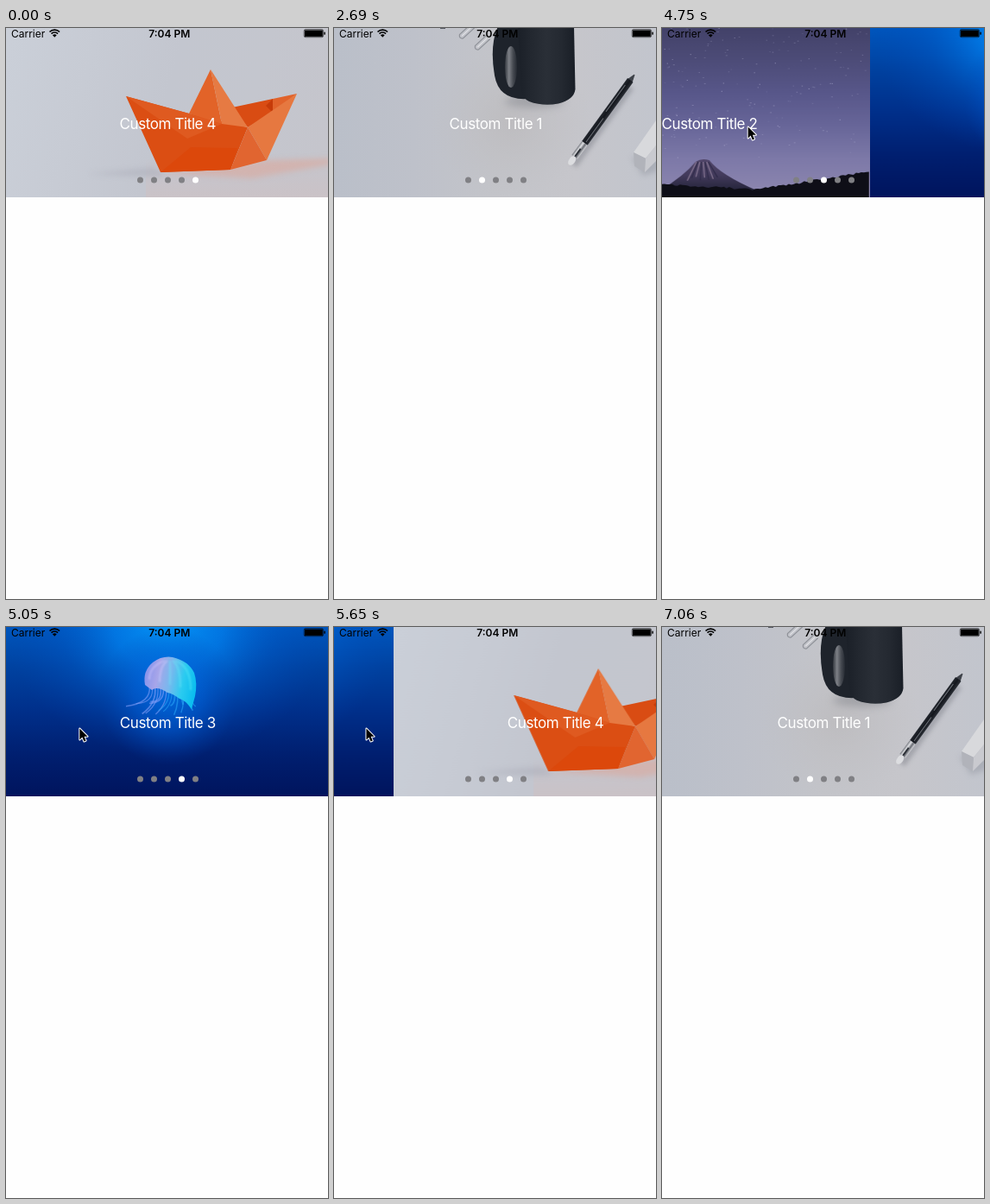
Recreate the animation shown at these times as an HTML page with a canvas. Size 373 px wide and 661 px high, loop 8 s.

```html
<!DOCTYPE html>
<html lang="en">
<head>
<meta charset="utf-8">
<title>Banner carousel</title>
<style>
  html, body { margin: 0; width: 100%; height: 100%; overflow: hidden; background: #fefefe; }
  canvas { display: block; width: 373px; height: 661px; }
</style>
</head>
<body>
<canvas id="stage"></canvas>
<script>
const W = 373, H = 661, BANNER = 196, LOOP = 8000;
const scale = window.devicePixelRatio || 1;
let g;

function prepare(canvas, w, h) {
  canvas.width = Math.round(w * scale);
  canvas.height = Math.round(h * scale);
  const ctx = canvas.getContext('2d');
  ctx.scale(scale, scale);
  return ctx;
}

// ---- drawing helpers ----
function stops(grad, colors) {
  colors.forEach((c, i) => grad.addColorStop(i / (colors.length - 1), c));
  return grad;
}
const lin = (x0, y0, x1, y1, ...colors) => stops(g.createLinearGradient(x0, y0, x1, y1), colors);
const across = (x0, x1, ...colors) => lin(x0, 0, x1, 0, ...colors);
const down = (y0, y1, ...colors) => lin(0, y0, 0, y1, ...colors);
const rad = (r, ...colors) => stops(g.createRadialGradient(0, 0, 0, 0, 0, r), colors);

function fill(style, x = 0, y = 0, w = W, h = BANNER) {
  g.fillStyle = style;
  g.fillRect(x, y, w, h);
}
function poly(style, ...points) {
  g.beginPath();
  points.forEach(([x, y]) => g.lineTo(x, y));
  g.closePath();
  g.fillStyle = style;
  g.fill();
}
function oval(style, x, y, rx, ry = rx) {
  g.beginPath();
  g.ellipse(x, y, rx, ry, 0, 0, 7);
  g.fillStyle = style;
  g.fill();
}
function shape(style, d) {
  g.fillStyle = style;
  g.fill(new Path2D(d));
}
function line(style, width, d) {
  g.strokeStyle = style;
  g.lineWidth = width;
  g.stroke(new Path2D(d));
}
function blurred(px, draw) {
  g.save();
  g.filter = `blur(${px * scale}px)`;
  draw();
  g.restore();
}
function placed(x, y, turn, draw) {
  g.save();
  g.translate(x, y);
  g.rotate(turn);
  draw();
  g.restore();
}
function glow(x, y, r, stretch, ...colors) {
  placed(x, y, 0, () => {
    g.scale(stretch, 1);
    oval(rad(r, ...colors), 0, 0, r);
  });
}
function randomFrom(seed) {
  return () => (seed = seed * 16807 % 2147483647) / 2147483647;
}

// ---- slides ----
function tower() {
  fill(lin(-58, 177, 30, -90, '#a9abcb', '#8ea4d7', '#6497d5', '#4487c8', '#1e7cc8', '#0075c6'));
  glow(208, 0, 48, 1, 'rgba(185,160,214,.95)', 'rgba(145,150,215,.65)', 'rgba(60,130,205,0)');
  blurred(2.5, () => {
    fill(across(168, 212, '#b98a62', '#b1786f', '#dcb29f', '#c7a5b4'), 168, -8, 43, 66);
    oval('#e8c8af', 198, 28, 7, 13);
    oval(across(157, 219, '#cf973c', '#9b683d', '#654643', '#76545a', '#a38992'), 188, 70, 30, 19);
    line('#d0953f', 5, 'M166 84 Q158 64 170 38');
    oval('#60434a', 186, 68, 12, 11);
  });
  blurred(1.2, () => fill(across(162, 215, '#dba85c', '#cb9852', '#8f7163', '#555568', '#5c5d70',
    '#81798a', '#9c909f', '#938b9b', '#9094b8'), 162.5, 84, 52, 118));
}

function pencil() {
  // drawn along its own axis, from the tip
  blurred(2.5, () => fill('rgba(110,114,124,.4)', 14, -9, 112, 8));
  poly('#3f434a', [0, -.6], [9, -3.5], [9, 3.5], [0, .6]);
  fill(down(-4, 4, '#2c3037', '#14171d', '#23272e'), 8, -4, 90, 8);
  fill('#72767d', 16, 1, 38, 1);
  fill('#72767d', 62, -1, 34, 1);
  fill(down(-4, 4, '#d4d5d9', '#686b72', '#e0e1e4', '#777a81'), 98, -4, 20, 8);
  fill('#2b2f36', 106, -1, 14, 2);
  oval('#dcdde0', 123, 0, 6, 3.6);
}

function desk() {
  fill(across(0, W, '#babfc9', '#bec1ca', '#c3c4c9', '#c6c6cb', '#c2c5cd'));
  glow(205, 110, 85, 1.1, 'rgba(186,184,186,.65)', 'rgba(190,189,192,.4)', 'rgba(190,190,195,0)');
  blurred(5, () => oval('rgba(120,122,130,.45)', 232, 85, 34, 7));
  // paper clips
  for (const [x, y] of [[144, 9], [162, 22]]) {
    placed(x, y, -.75, () => {
      line('#8f9299', 1.2, 'M20 0 H2 Q-2 3 2 6 H20');
      line('#e4e5e9', 1, 'M3 3 H18');
    });
  }
  fill('#555961', 123, 0, 6, 1);
  // mug
  shape('#1e232b', 'M190 -2 Q180 20 186 55 Q191 84 224 82 L232 -2 Z');
  oval(across(198, 212, '#34383f', '#7d8086', '#474b52', '#252a32'), 205, 45, 7, 24);
  shape(across(212, 280, '#1a1f27', '#232830', '#2a2f37', '#242931', '#191e26'),
    'M213 -2 H278 L279.5 71 Q278 83 260 87.5 Q242 91 226 85 Q218 81 217 73 Z');
  placed(348, 54, Math.atan2(106, -77), pencil);
  // eraser
  blurred(3, () => poly('rgba(135,139,149,.4)', [345, 150], [358, 171], [376, 165], [376, 145]));
  const edge = [361, 151], left = [347, 144];
  poly('#d8d9dc', [W, 107], left, edge, [W, 136]);
  poly('#b1b3ba', left, edge, [360, 167], [348, 160]);
  poly('#c9cacf', edge, [W, 136], [W, 154], [360, 167]);
}

function night() {
  fill(down(0, 190, '#434269', '#4d4c78', '#58578a', '#686699', '#7d79a8', '#8c86af'));
  const rnd = randomFrom(71);
  for (let i = 0; i < 230; i++) {
    g.globalAlpha = .15 + .4 * rnd();
    fill('#d5d4ef', rnd() * W, rnd() ** 1.3 * 150, 1, 1);
  }
  g.globalAlpha = 1;
  shape(down(152, 188, '#51466a', '#433b5c', '#25243b'),
    'M130 188 Q158 171 171 155 Q178 150 187 153 Q200 170 242 188 Z');
  for (let i = 0; i < 8; i++) {
    const x = 172 + i * 2, fan = (i - 3.5) * 3;
    line(i % 2 ? '#302b49' : '#877793', 1.2, `M${x} 155 L${x + fan} ${170 + rnd() * 8}`);
  }
  let land = 'M0 196';
  for (let x = 0; x <= W; x += 3) {
    const base = x < 240 ? 178 + 9 * (x / 240) ** 2 : 187 - (x - 240) * .158;
    land += `L${x} ${base + rnd() * 2.5 - 1}`;
  }
  shape('#0e0e17', land + 'V196 Z');
}

function jelly() {
  fill(down(0, BANNER, '#0056bd', '#00419f', '#002f8a', '#001f70', '#00145d'));
  glow(188, 0, 150, 1.25, 'rgba(4,151,250,.95)', 'rgba(2,127,237,.78)', 'rgba(0,93,205,.35)', 'rgba(0,70,180,0)');
  glow(188, 80, 80, 1, 'rgba(0,112,232,.75)', 'rgba(0,94,215,.5)', 'rgba(0,70,180,0)');
  // trailing arms
  blurred(.7, () => {
    const rnd = randomFrom(19);
    for (let i = 0; i < 15; i++) {
      const x = 166 + i * 3.2, end = x - 27 + i * 2.1 + rnd() * 9;
      line(i < 7 ? 'rgba(130,157,246,.6)' : 'rgba(43,170,247,.55)', 1 + rnd(),
        `M${x} 68 Q${x + 3} 88 ${end} ${86 + rnd() * 16}`);
    }
  });
  shape(lin(161, 50, 221, 62, '#8593ec', '#a7a5e9', '#78b8ee', '#2bcbf0', '#0bbdef'),
    'M161 67 Q158 51 170 41 Q181 33 193 35 Q211 39 218 53 Q222 65 219 80 L215 95 Q207 84 201 83 Q193 77 187 76 Q175 68 169 73 Z');
  // ribs fan out from the crown
  blurred(1, () => {
    for (let i = 0; i < 5; i++) {
      const x = 166 + i * 12;
      line(i < 2 ? 'rgba(220,207,255,.55)' : 'rgba(105,243,250,.5)', 1.7,
        `M${x} ${61 + i * 3} Q${x} 45 ${184 + i * 3} 39`);
    }
  });
}

function boat() {
  fill(lin(0, 30, W, 130, '#cacfd8', '#c7cbd4', '#c3c6cf', '#c4c6ce', '#c5c5cc'));
  fill(down(150, BANNER, 'rgba(202,194,199,0)', 'rgba(203,194,198,.9)'), 162, 150, 211, 46);
  blurred(3, () => {
    poly('rgba(174,176,187,.6)', [95, 169], [170, 162], [185, 169], [175, 172]);
    poly('rgba(216,173,164,.7)', [180, 168], [303, 153], [376, 151], [376, 158], [285, 174]);
  });
  const bow = [139, 79], mast = [237, 48], stern = [337, 76];
  const notch = [212, 99], fold = [250, 111], waist = [280, 115], rim = [309, 82], tuck = [309, 98];
  const keelL = [179, 167], keelR = [260, 164], heel = [302, 153];
  poly('#db4e13', bow, notch, waist, keelR, keelL);
  poly('#df5a20', bow, notch, fold, [210, 128]);
  poly('#dc480b', keelL, [214, 138], [268, 139], keelR);
  poly('#d94c13', [262, 92], rim, tuck, waist);
  poly('#c63b09', [301, 90], rim, tuck);
  poly('#e26328', mast, notch, fold);
  poly('#e67a43', mast, fold, waist);
  poly('#e1632b', rim, stern, tuck);
  poly('#e67840', stern, waist, heel);
  poly('#e16530', waist, heel, keelR);
}

const slides = [tower, desk, night, jelly, boat].map(paint => {
  const canvas = document.createElement('canvas');
  g = prepare(canvas, W, BANNER);
  paint();
  return canvas;
});

// ---- motion ----
// Autoplay steps; one due during the second swipe waits until it ends.
const AUTOPLAY = [1190, 2690, 4190, 5920, 7060];
const SWIPES = [
  { start: 4580, release: 4770, end: 5040 },
  { start: 5390, release: 5530, end: 5920 }
];
// time, x, y
const POINTER = [
  [3350, 355, 129], [3530, 296, 123], [3750, 335, 125], [3960, 335, 125],
  [4190, 231, 113], [4580, 231, 113], [4770, 84, 113], [5050, 84, 116],
  [5390, 198, 116], [5530, 36, 116], [5650, 36, 116],
  [5890, 148, 125], [6370, 148, 125], [6550, W, 147]
];

function pageAt(t) {
  const turns = [...AUTOPLAY, ...SWIPES.map(s => s.end)].filter(at => at <= t).length;
  return (4 + turns) % slides.length;
}

function pointerAt(t) {
  const i = POINTER.findIndex(p => p[0] > t);
  if (i < 1) return null;
  const [t0, x0, y0] = POINTER[i - 1], [t1, x1, y1] = POINTER[i];
  const p = (t - t0) / (t1 - t0);
  return [x0 + (x1 - x0) * p, y0 + (y1 - y0) * p];
}

// The page follows the pointer, then settles with a cubic ease-out.
function offsetAt(t) {
  const s = SWIPES.find(s => t >= s.start && t < s.end);
  if (!s) return 0;
  const drag = pointerAt(s.start)[0] - pointerAt(Math.min(t, s.release))[0];
  const p = Math.max(0, (t - s.release) / (s.end - s.release));
  return W - (W - drag) * (1 - p) ** 3;
}

// ---- screen ----
function text(str, x, y, font, color, align, spacing = 0) {
  g.font = font + ' Inter, sans-serif';
  g.letterSpacing = spacing + 'px';
  g.textAlign = align;
  g.fillStyle = color;
  g.fillText(str, x, y);
}

function slide(index, x) {
  g.drawImage(slides[index], x, 0, W, BANNER);
  text('Custom Title ' + index, x + 187.3, 117, '17px', '#fff', 'center', -.4);
}

function statusBar() {
  text('Carrier', 6, 11, '12px', '#000', 'left');
  text('7:04 PM', 189.3, 11, '600 12px', '#000', 'center');
  for (const r of [8.2, 5.3]) {
    g.beginPath();
    g.arc(56.3, 10.3, r, -Math.PI * .75, -Math.PI * .25);
    g.strokeStyle = '#000';
    g.lineWidth = 1.7;
    g.stroke();
  }
  shape('#000', 'M56.3 10.8 L53.9 8.3 Q56.3 6.3 58.7 8.3 Z');
  g.lineWidth = .6;
  g.beginPath();
  g.roundRect(345.2, 1.7, 22.4, 9, 1.8);
  g.stroke();
  fill('#000', 346, 2.5, 20.8, 7.4);
  fill('#000', 368.4, 4.7, 1.4, 3);
}

function pointer([x, y]) {
  placed(x, y, 0, () => {
    g.lineJoin = 'round';
    const arrow = 'M1 1.5 L1 14.5 L4 11.6 L6.1 16.5 L8.3 15.5 L6.2 10.8 L10.2 10.8 Z';
    line('#fff', 2, arrow);
    shape('#000', arrow);
  });
}

const screen = prepare(document.getElementById('stage'), W, H);

function render(t) {
  g = screen;
  fill('#fefefe', 0, 0, W, H);
  const page = pageAt(t), offset = offsetAt(t), at = pointerAt(t);
  slide(page, -offset);
  if (offset) slide((page + 1) % slides.length, W - offset);
  for (let i = 0; i < slides.length; i++) {
    oval(i === page ? '#fff' : '#808084', 155.5 + 16 * i, 176, 3.5);
  }
  statusBar();
  if (at) pointer(at);
}

const began = performance.now();
function tick() {
  render((performance.now() - began) % LOOP);
  requestAnimationFrame(tick);
}
tick();
</script>
</body>
</html>
```
